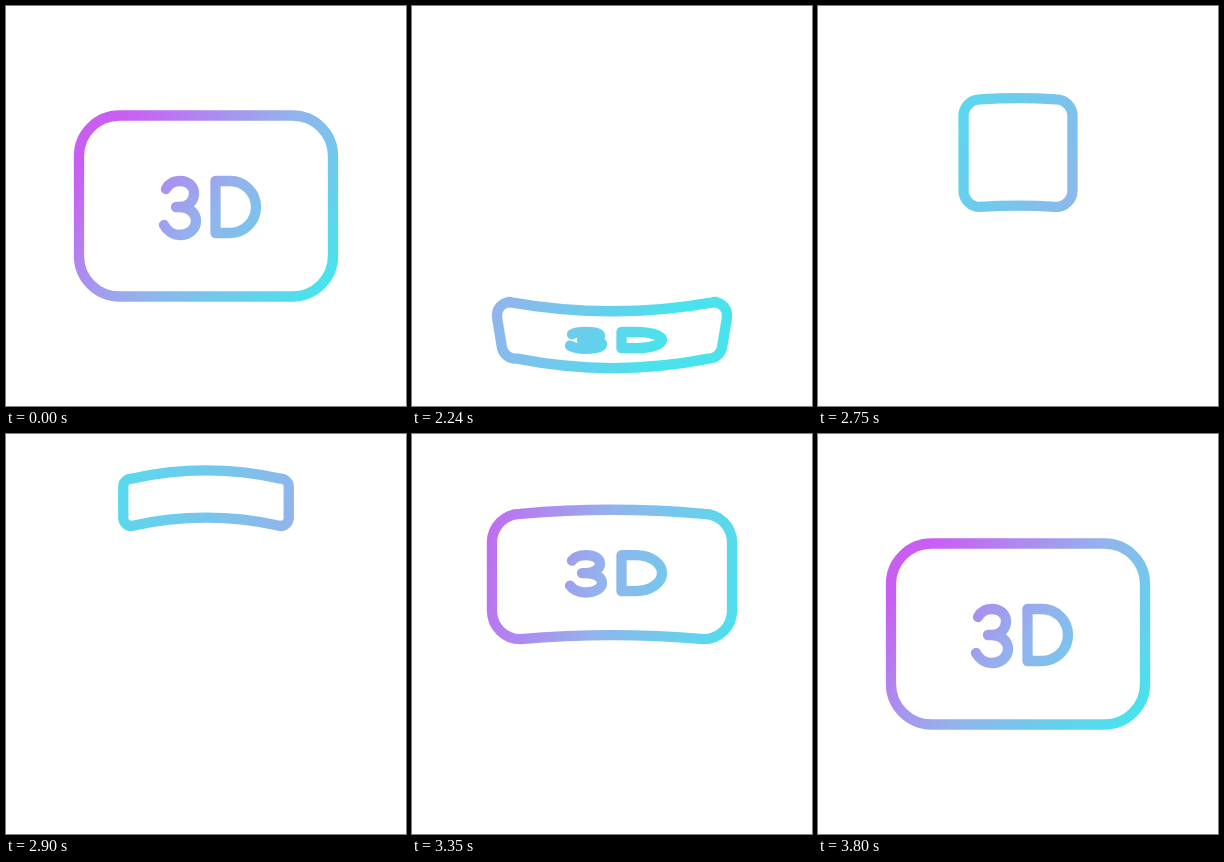
Animation, 400 px wide and 400 px high, one loop 3.89 s. Source, as an HTML page with a canvas:

```html
<!DOCTYPE html>
<html>
<head>
<meta charset="utf-8">
<style>
html, body { margin: 0; width: 100%; height: 100%; overflow: hidden; background: #fff; }
canvas { display: block; }
</style>
</head>
<body>
<canvas id="stage" width="400" height="400"></canvas>
<script>
const ctx = document.getElementById('stage').getContext('2d');
const LOOP = 3890, REST = 2000, STEP = 30;
const TOP = 109.5, BOTTOM = 290.5, RADIUS = 164;
const label = new Path2D(
  'M160 183C163 177 168 175 174 175C182 175 188 180 188 187.5C188 195 182 201 174 201H170' +
  'M174 201C183 201 190 207 190 215C190 223 183 229 174 229C167 229 161 225 158 219' +
  'M209.5 175H224A26 26 0 0 1 224 227H209.5Z');

// Gradient lines: x1, y1, x2, y2
const restGrad = [110, 120, 310, 285];
const lowGrad = [-100, 219, 236, 340];
const highGrad = [-90, 50, 245, 50];
const swingGrad = [145, 150, 400, 235];

const mix = (a, b, p) => a + (b - a) * p;
const mixAll = (a, b, p) => a.map((v, i) => mix(v, b[i], p));
const ease = (t, from, to) => {
  const s = Math.min(1, Math.max(0, (t - from) / (to - from)));
  return s * s * (3 - 2 * s);
};

// Front card drops and flattens at the bottom
function drop(t) {
  const p = ease(t, 0, 330), pb = ease(t, 0, 255) ** 1.3;
  const top = mix(TOP, 349, p), u = (top - 200) / 163;
  return {
    top, bottom: mix(BOTTOM, 363, pb),
    wTop: t ? 260 - (u < 0 ? 20 : 60) * u * u : 254, wBottom: 254 - 38 * pb,
    bow: 10 * Math.min(1, p * 1.15), front: true,
    grad: mixAll(restGrad, lowGrad, p)
  };
}

// Back of the card travels up the far side of the wheel
function rise(t) {
  const a = mix(-90, 90, ease(t, 300, 1080));
  const sin = d => Math.sin(Math.max(-90, Math.min(90, d)) * Math.PI / 180);
  const y = d => 200 - RADIUS * sin(d);
  const width = 210 - 108 * Math.cos(a * Math.PI / 180);
  const shift = 200 - 156 * sin(a) - 141;
  return {
    top: y(a + 20.5), bottom: y(a - 20.5), wTop: width, wBottom: width,
    bow: -10 * sin(a) * Math.abs(sin(a)), front: false,
    grad: [468, 277 + shift, 80, 119 + shift]
  };
}

// Front card swings down, overshoots and settles
function swing(t) {
  const p = ease(t, 1080, 1560), q = ease(t, 1560, 1800);
  const width = 210 + 44 * p ** 0.73;
  return {
    top: mix(mix(37, 124, p ** 1.55), TOP, q),
    bottom: mix(mix(48, 306, p), BOTTOM, q),
    wTop: width, wBottom: width, bow: -10 * (1 - p), front: true,
    grad: mixAll(mixAll(highGrad, swingGrad, p), restGrad, q)
  };
}

function cardPath({ top, bottom, wTop, wBottom, bow, front }) {
  const h = bottom - top, r = h * (front ? 0.215 : 0.14) + 1.5;
  const a = wTop / 2, b = wBottom / 2, y1 = top - bow, y2 = bottom - bow;
  const path = new Path2D();
  path.moveTo(200 - a + r, y1);
  path.quadraticCurveTo(200, top + bow, 200 + a - r, y1);
  path.arcTo(200 + a, y1, 200 + b, y2, r);
  path.arcTo(200 + b, y2, 200 + b - r, y2, r);
  path.quadraticCurveTo(200, bottom + bow, 200 - b + r, y2);
  path.arcTo(200 - b, y2, 200 - a, y1, r);
  path.arcTo(200 - a, y1, 200 - a + r, y1, r);
  path.closePath();
  if (front) {
    const s = h / (BOTTOM - TOP);
    path.addPath(label, new DOMMatrix([1, 0, 0, s, 0, top - TOP * s]));
  }
  return path;
}

function draw(now) {
  const t = Math.min(1800, Math.max(0, Math.floor((now % LOOP - REST) / STEP) * STEP));
  const card = t < 300 ? drop(t) : t < 1080 ? rise(t) : swing(t);
  const paint = ctx.createLinearGradient(...card.grad);
  ['#c95ff2', '#92b4ec', '#4ae2ec'].forEach((c, i) => paint.addColorStop(i / 2, c));
  ctx.clearRect(0, 0, 400, 400);
  ctx.strokeStyle = paint;
  ctx.lineWidth = 10.3;
  ctx.lineCap = ctx.lineJoin = 'round';
  ctx.stroke(cardPath(card));
}

const start = performance.now();
function tick() {
  draw(performance.now() - start);
  requestAnimationFrame(tick);
}
tick();
</script>
</body>
</html>
```
